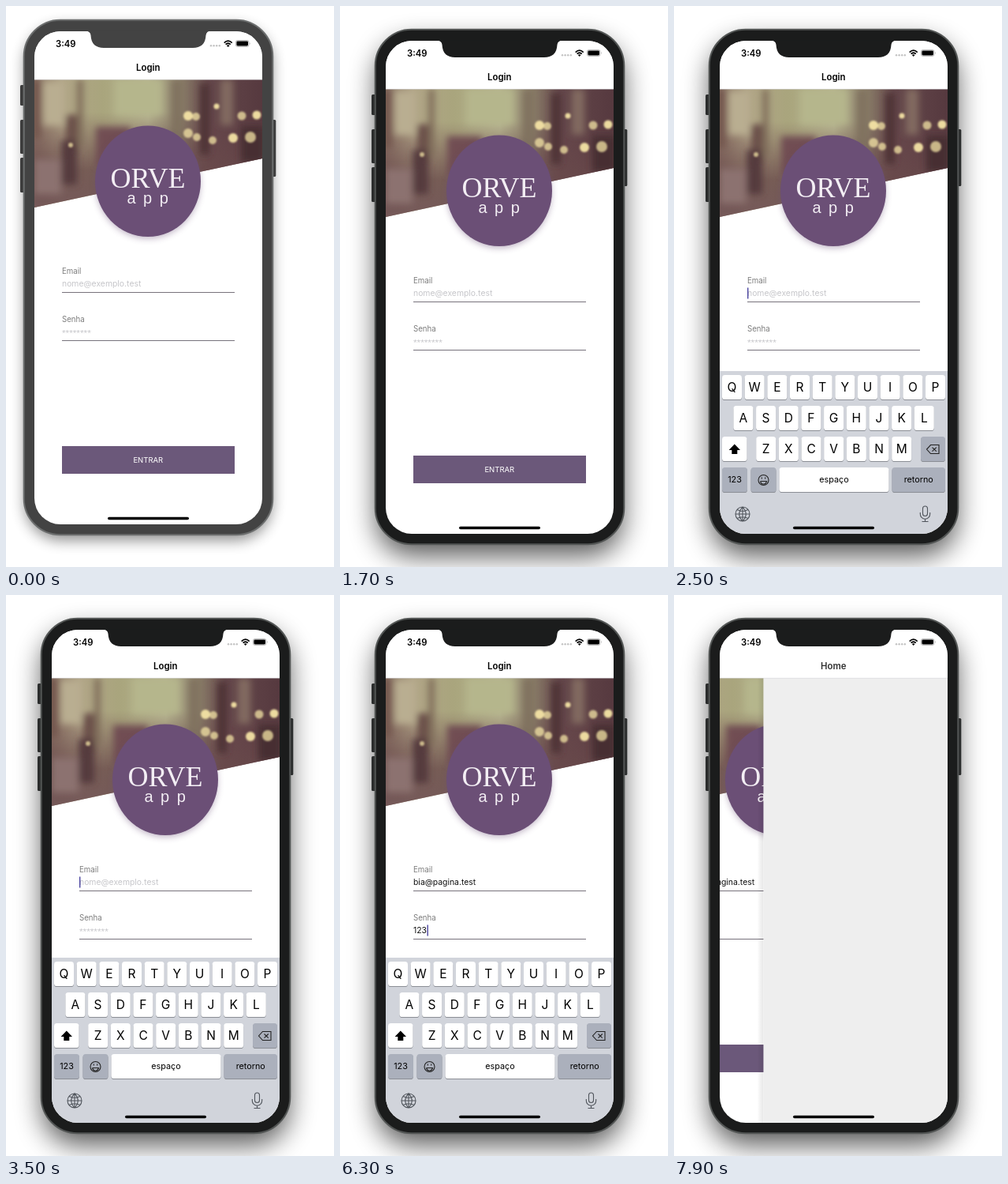
An HTML page for the animation above (8000 ms loop, 416 px wide and 710 px high).

```html
<!DOCTYPE html>
<html lang="pt">
<head>
<meta charset="utf-8">
<title>Login</title>
<style>
  html, body { margin: 0; width: 100%; height: 100%; overflow: hidden; background: #fff; }
  svg { display: block; width: 416px; height: 710px; font-family: Inter, "Open Sans", sans-serif; }
  .mid { text-anchor: middle; }
  .title { font-size: 11.4px; font-weight: 600; }
  .label { font-size: 9.7px; fill: #7d7d7d; }
  .value { font-size: 10.4px; fill: #111; }
  .hint { fill: #c6c6ca; }
  .key { font-size: 15.5px; }
  .small { font-size: 10.8px; }
  .icon { fill: none; stroke: #50555c; stroke-width: 1.1; }
</style>
</head>
<body>
<svg viewBox="0 0 416 710">
  <defs>
    <clipPath id="screenClip"><rect x="58" y="44" width="289" height="624" rx="33"/></clipPath>
    <clipPath id="photoClip"><path d="M58 105H347V205L58 267Z"/></clipPath>
    <linearGradient id="street">
      <stop offset="0" stop-color="#8b7566"/><stop offset=".12" stop-color="#b0a486"/>
      <stop offset=".3" stop-color="#a9a57d"/><stop offset=".5" stop-color="#b7b590"/>
      <stop offset=".64" stop-color="#8c806a"/><stop offset=".76" stop-color="#65484b"/>
      <stop offset="1" stop-color="#56393f"/>
    </linearGradient>
    <linearGradient id="dusk" x2="0" y2="1">
      <stop offset=".25" stop-color="#6b454b" stop-opacity="0"/>
      <stop offset=".7" stop-color="#694a4b" stop-opacity=".8"/>
      <stop offset="1" stop-color="#765a5a"/>
    </linearGradient>
    <linearGradient id="edge">
      <stop offset="0" stop-color="#000" stop-opacity="0"/>
      <stop offset="1" stop-color="#000" stop-opacity=".1"/>
    </linearGradient>
    <filter id="soft" x="-20%" y="-20%" width="140%" height="140%"><feGaussianBlur stdDeviation="4"/></filter>
    <filter id="glow" x="-20%" y="-20%" width="140%" height="140%"><feGaussianBlur stdDeviation="1.2"/></filter>
    <filter id="wide" x="-30%" y="-30%" width="160%" height="160%"><feGaussianBlur stdDeviation="17"/></filter>
    <filter id="near" x="-30%" y="-30%" width="160%" height="160%"><feGaussianBlur stdDeviation="9"/></filter>
  </defs>
  <rect width="416" height="710" fill="#fff"/>
  <g id="phone">
    <rect id="shade" x="46" y="46" width="313" height="650" rx="46"/>
    <g id="buttons"></g>
    <rect id="body" x="44.7" y="29.7" width="315.6" height="651.6" rx="46" stroke-width="2"/>
    <g clip-path="url(#screenClip)">
      <rect x="58" y="44" width="289" height="624" fill="#fff"/>
      <g id="login">
        <g clip-path="url(#photoClip)">
          <rect x="58" y="105" width="289" height="164" fill="url(#street)"/>
          <rect x="58" y="105" width="289" height="164" fill="url(#dusk)"/>
          <g id="blurs" filter="url(#soft)"></g>
          <g id="lights" filter="url(#glow)" fill="#f3e3a4"></g>
        </g>
        <ellipse cx="202" cy="237" rx="66" ry="69" fill="#6b4f77" opacity=".45" filter="url(#soft)"/>
        <ellipse cx="202" cy="233.7" rx="67" ry="70.3" fill="#6b4f76"/>
        <g fill="#f3eef4">
          <text class="mid" x="202" y="242" font-family="'Liberation Serif', serif" font-size="36">ORVE</text>
          <text x="175.5" y="261.5" font-family="'Liberation Sans', sans-serif" font-size="20" letter-spacing="9.5">app</text>
        </g>
        <g id="fields"></g>
        <rect x="93" y="569" width="219" height="35" fill="#6b587a"/>
        <text class="mid" x="202.3" y="590" font-size="9.5" fill="#fff">ENTRAR</text>
      </g>
      <g id="home">
        <rect x="50" y="105" width="8" height="563" fill="url(#edge)"/>
        <rect x="58" y="105" width="289" height="563" fill="#eee"/>
      </g>
      <rect x="58" y="44" width="289" height="61" fill="#fff"/>
      <path d="M58 105.3H347" stroke="#d5d5d8" stroke-width=".6"/>
      <text id="loginTitle" class="title mid" x="202.3" y="94">Login</text>
      <text id="homeTitle" class="title mid" x="202.3" y="94">Home</text>
      <g id="keyboard"></g>
      <text x="85" y="64" font-size="11.3" font-weight="600">3:49</text>
      <g fill="#c3c3c3">
        <circle cx="282" cy="62.3" r="1.2"/><circle cx="285.6" cy="62.3" r="1.2"/>
        <circle cx="289.2" cy="62.3" r="1.2"/><circle cx="292.8" cy="62.3" r="1.2"/>
      </g>
      <g fill="none" stroke="#000" stroke-width="1.7">
        <path d="M298.7 58.6Q303.7 53.8 308.7 58.6M300.6 60.7Q303.7 57.8 306.8 60.7"/>
      </g>
      <path d="M301.8 61.9Q303.7 60.4 305.6 61.9L303.7 64Z"/>
      <rect x="313.4" y="55.6" width="16.6" height="7.8" rx="2.2" fill="none" stroke="#999" stroke-width=".7"/>
      <rect x="314.4" y="56.6" width="14.6" height="5.8" rx="1.3"/>
      <path d="M331 58v3q1.2-1.5 0-3" fill="#999"/>
      <rect x="151" y="658.8" width="103" height="3.5" rx="1.75"/>
    </g>
    <path id="notch" d="M123 43.5Q129 44 129.5 49C130 60 136 65 146 65H259C269 65 275 60 275.5 49Q276 44 282 43.5Z"/>
  </g>
</svg>
<script>
const $ = id => document.getElementById(id);

function add(parent, tag, attrs, text) {
  const el = document.createElementNS("http://www.w3.org/2000/svg", tag);
  for (const name in attrs) el.setAttribute(name, attrs[name]);
  if (text) el.textContent = text;
  parent.appendChild(el);
  return el;
}

// Side buttons: x, y, height
for (const [x, y, height] of [[40, 112, 26], [40, 156, 43], [40, 204, 44], [358, 156, 72]])
  add($("buttons"), "rect", { x, y, width: 6.3, height, rx: 1.5 });

// Blurred street: x, y, width, height, colour
[
  [52, 105, 14, 75, "#755850"], [70, 108, 26, 55, "#b9ae91"], [98, 150, 16, 50, "#6b504a"],
  [112, 105, 8, 85, "#81705c"], [136, 165, 44, 50, "#714d52"], [160, 105, 60, 45, "#b5b68c"],
  [58, 206, 34, 44, "#8c7270"], [92, 182, 20, 56, "#553a3c"], [232, 105, 14, 100, "#80725f"],
  [268, 110, 12, 90, "#4d3236"], [294, 105, 16, 58, "#826b60"], [320, 164, 30, 46, "#462d33"]
].forEach(([x, y, width, height, fill]) => add($("blurs"), "rect", { x, y, width, height, fill }));

// Street lights: x, y, radius
[
  [253, 151, 6], [263, 152, 5], [321, 151, 5.5], [340, 150, 5.5], [253, 173, 6], [264, 178, 5],
  [310, 179, 6], [332, 178, 7], [284, 182, 5], [289, 139, 3.5], [104, 188, 3]
].forEach(([cx, cy, r], i) => add($("lights"), "circle", { cx, cy, r, opacity: i % 3 ? .75 : .95 }));

const fields = [
  { label: "Email", hint: "nome@exemplo.test", text: "bia@pagina.test", y: 367, focus: 2200, typing: 3700, step: 80, blur: 5200 },
  { label: "Senha", hint: "********", text: "123", y: 428, focus: 5400, typing: 5700, step: 200, blur: 6340 }
];
for (const f of fields) {
  const g = $("fields");
  add(g, "text", { class: "label", x: 93, y: f.y - 15.7 }, f.label);
  const stars = f.hint[0] === "*";
  f.hintEl = add(g, "text", {
    class: "hint", x: 93, y: f.y + (stars ? 2.3 : 0), "font-size": stars ? 11.8 : 10.4,
    "font-family": stars ? "'Liberation Sans', sans-serif" : "Inter, sans-serif"
  }, f.hint);
  f.valueEl = add(g, "text", { class: "value", x: 93, y: f.y });
  f.caret = add(g, "rect", { y: f.y - 10.5, width: 1.4, height: 14, fill: "#4b45a0" });
  add(g, "path", { d: `M93 ${f.y + 7.5}H312`, stroke: "#77727c", "stroke-width": 1 });
}

const board = $("keyboard");
function key(x, y, width, label, fill = "#fff", type = "small") {
  add(board, "rect", { x, y: y + 1, width, height: 31, rx: 3.6, fill: "#8b8e95" });
  add(board, "rect", { x, y, width, height: 31, rx: 3.6, fill });
  if (label) add(board, "text", { class: type + " mid", x: x + width / 2, y: y + (type === "key" ? 21.2 : 19.2) }, label);
}
add(board, "rect", { x: 58, y: 459, width: 289, height: 214, fill: "#d1d4db" });
["QWERTYUIOP", "ASDFGHJKL", "ZXCVBNM"].forEach((row, r) => {
  const first = [61, 75.4, 104.2][r];
  [...row].forEach((ch, i) => key(first + i * 28.67, 464 + r * 39, 25, ch, "#fff", "key"));
});
const gray = "#abb0bc";
key(61, 542, 31.5);
key(313, 542, 31, "", gray);
key(61, 581, 32, "123", gray);
key(97.5, 581, 32, "", gray);
key(133.5, 581, 139, "espaço");
key(276.5, 581, 67.5, "retorno", gray);
add(board, "path", { d: "M76.8 551.5L84 559H80.3V564H73.3V559H69.6Z" });
const icon = (d, attrs) => add(board, "path", { class: "icon", d, ...attrs });
icon("M325.5 552.5H336V563.5H325.5L320.5 558ZM327.5 555.5L332.8 560.7M332.8 555.5L327.5 560.7", { style: "stroke:#222" });
icon("M107 597a6.5 6.5 0 1 1 13 0a6.5 6.5 0 1 1-13 0M109.5 598.5H117.5Q116.5 602 113.5 602T109.5 598.5M111.3 593.5v2M115.7 593.5v2", { style: "stroke:#222" });
icon("M78 640a9 9 0 1 1 18 0a9 9 0 1 1-18 0H96M87 631V649M87 631Q78.5 640 87 649Q95.5 640 87 631M80 634.5Q87 638 94 634.5M80 645.5Q87 642 94 645.5");
icon("M315.5 633a3 3 0 0 1 6 0v6.5a3 3 0 0 1-6 0ZM312.3 638v2a6.2 6.2 0 0 0 12.4 0v-2M318.5 646.5V649.5M314.5 649.5h8");

// Critically damped spring from 0 to 1
function spring(ms) {
  const x = Math.max(0, ms) * 0.01826;
  return 1 - (1 + x) * Math.exp(-x);
}
const move = (id, x, y) => $(id).setAttribute("transform", `translate(${x} ${y})`);
const set = (id, attrs) => { for (const name in attrs) $(id).setAttribute(name, attrs[name]); };

function drawField(f, t) {
  const count = t < f.typing ? 0 : Math.min(f.text.length, Math.floor((t - f.typing) / f.step) + 1);
  f.valueEl.textContent = f.text.slice(0, count);
  f.hintEl.setAttribute("visibility", count ? "hidden" : "inherit");
  const lit = t >= f.focus && t < f.blur && (count > 0 || (t - f.focus) % 1000 < 600);
  f.caret.setAttribute("visibility", lit ? "inherit" : "hidden");
  f.caret.setAttribute("x", 93 + (count ? f.valueEl.getComputedTextLength() + 0.5 : 0));
}

function draw(t) {
  const active = t >= 1300;
  const frameColor = active ? "#1b1c1c" : "#434343";
  move("phone", active ? 0 : -22, active ? 0 : -12);
  set("shade", {
    y: active ? 46 : 38, opacity: active ? .65 : .45, filter: active ? "url(#wide)" : "url(#near)"
  });
  set("body", { fill: frameColor, stroke: active ? "#535655" : "#6c6e6e" });
  set("buttons", { fill: active ? "#2b2d2d" : "#3c3c3c" });
  set("notch", { fill: frameColor });

  fields.forEach(f => drawField(f, t));

  const raised = spring(t - 2160) - spring(t - 6340);
  move("keyboard", 0, 209 * (1 - raised));

  const push = spring(t - 7733);
  move("login", -86.7 * push, 0);
  move("home", 289 * (1 - push), 0);
  set("home", { visibility: push > 0 ? "visible" : "hidden" });
  set("loginTitle", { opacity: Math.max(0, 1 - 2 * push) });
  set("homeTitle", { opacity: push });
}

function tick() {
  draw(Math.floor(performance.now() % 8000 / 100) * 100);
  requestAnimationFrame(tick);
}
tick();
</script>
</body>
</html>
```
